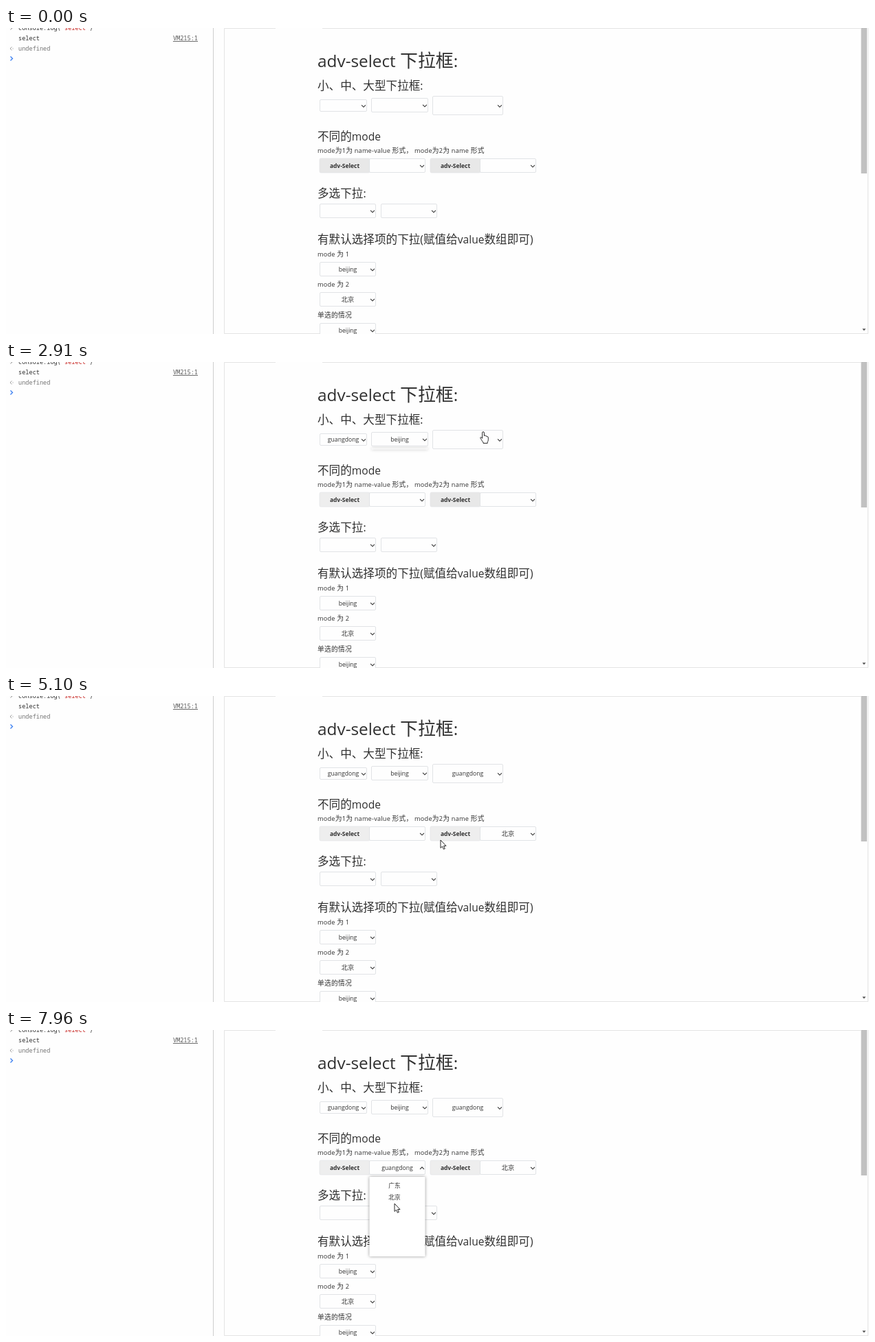
Write an HTML page that moves like this. It is 1255 by 446 pixels and loops after 8 s.

```html
<!DOCTYPE html>
<html lang="zh-CN">
<head>
<meta charset="utf-8">
<title>adv-select</title>
<style>
html, body { margin: 0; width: 100%; height: 100%; overflow: hidden; background: #fefefe; }
#stage { display: block; width: 1255px; height: 446px; }
text { font-family: "Open Sans", "Noto Sans CJK SC", "Noto Sans CJK JP", sans-serif; fill: #303030; white-space: pre; }
.mono { font-family: "Noto Sans Mono", "DejaVu Sans Mono", monospace; }
.note { letter-spacing: .22px; }
.box { fill: #fefefe; stroke: #e1e3e6; }
.chev { fill: none; stroke: #303030; stroke-width: 1.1; }
.panel { fill: #fff; filter: drop-shadow(0 .5px 2px rgba(0,0,0,.42)); }
.pointer { fill: #fff; stroke: #111; stroke-width: .9; stroke-linejoin: round; }
</style>
</head>
<body>
<svg id="stage" viewBox="0 0 1255 446"></svg>
<script>
const stage = document.getElementById('stage');
const LOOP = 8000, FULL = 116, SLIDE = 310, ROW = 17, LEFT = 453;

function set(n, attrs) {
  for (const k in attrs) n.setAttribute(k, attrs[k]);
}
function el(tag, attrs, parent = stage) {
  const n = document.createElementNS('http://www.w3.org/2000/svg', tag);
  set(n, attrs);
  return parent.appendChild(n);
}
const show = (n, on) => { n.style.display = on ? '' : 'none'; };
const line = (d, stroke) => el('path', { d, stroke, fill: 'none' });

// Latin runs are set slightly smaller than the Chinese ones
function write(node, str, size) {
  node.textContent = '';
  for (const run of str.match(/[\u3000-\uffff]+|[^\u3000-\uffff]+/g) || []) {
    const wide = run.charCodeAt(0) >= 0x3000;
    el('tspan', { 'font-size': wide ? size : size * .94 }, node).textContent = run;
  }
}
function label(x, y, str, size, attrs = {}, parent = stage) {
  const n = el('text', { x, y, ...attrs }, parent);
  write(n, str, size);
  return n;
}
const mid = { 'text-anchor': 'middle' };

// console
function mono(x, y, str, fill, more = {}) {
  const n = el('text', { x, y, class: 'mono', 'font-size': 8.6, style: 'fill:' + fill, ...more });
  n.textContent = str;
  return n;
}
const code = mono(18, 2.6, 'console.log(', '#303030');
el('tspan', { fill: '#c41a16' }, code).textContent = '"select"';
el('tspan', {}, code).textContent = ')';
mono(18, 18, 'select', '#303030');
mono(279, 18, 'VM215:1', '#545454', { 'text-anchor': 'end', 'text-decoration': 'underline' });
mono(18, 33, 'undefined', '#777');
line('M6.5 -3.5l3 3l-3 3', '#888');
line('M8.5 27.5L6 30l2.5 2.5M9.5 30h1.2', '#a0a0a0');
set(line('M6.5 41.5l3 3l-3 3', '#367cf1'), { 'stroke-width': 1.3 });

// page frame
line('M301.5 0V446', '#cfcfcf');
line('M392 .5H317.5V445.5H1253.5V0M460 .5H1243', '#e4e4e4');
el('rect', { x: 1243.5, y: 0, width: 8.5, height: 212, fill: '#c1c1c1' });
el('path', { d: 'M1245.3 438.3h5l-2.5 3z', fill: '#505050' });

// headings and notes
const heading = (y, s) => label(LEFT, y, s, 16.6);
const note = (y, s) => label(LEFT, y, s, 9.75, { class: 'note' });
label(LEFT, 57.3, 'adv-select 下拉框:', 25.9);
heading(89.8, '小、中、大型下拉框:');
heading(163.7, '不同的mode');
heading(247.3, '多选下拉:');
heading(314.3, '有默认选择项的下拉(赋值给value数组即可)');
note(182, 'mode为1为 name-value 形式， mode为2为 name 形式');
['mode 为 1', 'mode 为 2', '单选的情况'].forEach((s, i) => note(332.5 + 44.5 * i, s));

// select boxes
const UP = 'M-2.9 1.5L0 -1.4L2.9 1.5', DOWN = 'M-2.9 -1.4L0 1.5L2.9 -1.4';
function select(x, y, value = '', w = 82, h = 21) {
  el('rect', { x: x + .5, y: y + .5, width: w - 1, height: h - 1, rx: 1.5, class: 'box' });
  const cy = y + h / 2;
  const text = label(x + w / 2, cy + 3.4, value, 9.2, mid);
  const chev = el('path', { d: DOWN, class: 'chev', transform: `translate(${x + w - 5} ${cy + .8})` });
  return { x, y, w, h, cy, text, chev };
}
function tagged(x) {
  const tag = el('rect', { x, y: 190, width: 73, height: 21, rx: 2, stroke: '#dfe1e4', 'stroke-width': .6 });
  label(x + 36.5, 203.9, 'adv-Select', 9, { ...mid, 'font-weight': 700 });
  return { ...select(x + 72, 190), tag };
}
const small = select(456, 104, '', 69, 18);
const medium = select(531, 102, '', 83);
const large = select(620, 99, '', 103, 28);
const first = tagged(456), second = tagged(617);
const selects = [small, medium, large, first, second];
[456, 545].forEach(x => select(x, 256));
['beijing', '北京', 'beijing'].forEach((v, i) => select(456, Math.round(340.6 + 44.5 * i), v));

// drop-down panels
for (const s of selects) {
  s.top = s.y + s.h + 3;
  s.panel = el('g', {});
  s.back = el('rect', { x: s.x + .5, y: s.top, width: s.w - 1, rx: 1, class: 'panel' }, s.panel);
  s.clip = el('svg', { x: s.x, y: s.top, width: s.w, overflow: 'hidden' }, s.panel);
  s.rows = ['广东', '北京'].map((name, i) => ({
    bar: el('rect', { x: 4, y: 4 + ROW * i, width: s.w - 8, height: ROW, fill: '#5272da' }, s.clip),
    text: label(s.w / 2 - 4, 15.9 + ROW * i, name, 8.7, mid, s.clip)
  }));
}

// each visit: click the box, slide to a row, click that; aim is the place across the box
const visits = [
  { s: small, aim: .63, open: 700, pick: 1490, row: 0, value: 'guangdong' },
  { s: medium, aim: .53, open: 1840, pick: 2530, row: 1, value: 'beijing' },
  { s: large, aim: .72, open: 2990, pick: 3490, row: 0, value: 'guangdong' },
  { s: second, aim: .72, open: 4170, pick: 4640, row: 1, value: '北京' },
  { s: first, aim: .56, open: 5360, pick: 6090, row: 1, value: 'beijing' },
  { s: first, aim: .56, open: 6550, pick: 7010, row: 0, value: 'guangdong' },
  { s: first, aim: .5, open: 7540, pick: LOOP + 500, row: 1, value: '' }
];

// pointer stops: the visits plus a few detours
const stops = [
  [130, 730, 405], [1200, 499, 148], [2740, 642, 97], [2910, 694, 102], [5100, 632, 210], [7950, 565, 253]
];
for (const { s, aim, open, pick, row } of visits) {
  const x = s.x + aim * s.w, y = s.top + 4 + ROW * (row + .5);
  stops.push([open - 60, x, s.cy], [open + 90, x, s.cy], [open + 210, x, y], [pick + 20, x, y]);
}
stops.sort((a, b) => a[0] - b[0]);

const arrow = el('path', { class: 'pointer', d: 'M0 0V11.5L2.6 9.2L4.4 13.3L6.3 12.5L4.6 8.5H8Z' });
const hand = el('path', { class: 'pointer', d:
  'M-1.4 1Q-1.4 -.3 0 -.3Q1.4 -.3 1.4 1V5.6Q1.6 4.7 2.8 5Q3.8 5.2 3.9 6Q5.3 5.4 5.7 6.7' +
  'Q7.3 6.4 7.3 8.2V11.5Q7.2 13.3 6.2 14.5V16.3H0V15Q-1.5 13.5 -2.5 11.4Q-4 9.3 -4.2 8.4' +
  'Q-4 7.2 -2.7 7.8L-1.4 9.2Z' });

function ease(v) {
  v = Math.min(1, Math.max(0, v));
  return v * v * (3 - 2 * v);
}

function pointerAt(t) {
  const i = stops.findIndex(p => p[0] > t);
  if (i < 1) return null;
  const [t0, x0, y0] = stops[i - 1], [t1, x1, y1] = stops[i];
  const k = ease((t - t0) / (t1 - t0));
  return [x0 + (x1 - x0) * k, y0 + (y1 - y0) * k];
}

// returns whether the pointer is over something clickable
function drawSelect(s, t, p) {
  let value = '', open = false, visible = false, h = 0;
  for (const v of visits) {
    if (v.s !== s || t < v.open) continue;
    const from = v.open + 80;
    open = t < v.pick;
    if (!open) value = v.value;
    visible = t >= from && t < v.pick + SLIDE + 90;
    h = FULL * (open ? ease((t - from) / SLIDE) : 1 - ease((t - v.pick) / SLIDE));
  }
  if (s.value !== value) write(s.text, s.value = value, 9.2);
  s.chev.setAttribute('d', open ? UP : DOWN);
  show(s.panel, visible);
  s.back.setAttribute('height', Math.max(1.2, h));
  s.clip.setAttribute('height', h);

  const inX = p && p[0] > s.x && p[0] < s.x + s.w;
  let hot = inX && p[1] >= s.y && p[1] < s.y + s.h;
  s.rows.forEach((row, i) => {
    const dy = p ? p[1] - s.top - 4 - ROW * i : -1;
    const over = visible && inX && dy >= 0 && dy < ROW && p[1] < s.top + h;
    show(row.bar, over);
    row.text.style.fill = over ? '#fff' : '#303030';
    hot = hot || over;
  });
  return hot;
}

function draw(t) {
  const p = pointerAt(t);
  const hot = selects.map(s => drawSelect(s, t, p)).some(Boolean);
  first.tag.setAttribute('fill', small.value ? '#eee' : '#e8e8e8');
  second.tag.setAttribute('fill', large.value ? '#eee' : '#e8e8e8');
  show(hand, p && hot);
  show(arrow, p && !hot);
  if (p) set(hot ? hand : arrow, { transform: `translate(${p[0]} ${p[1]})` });
}

function tick() {
  draw(performance.now() % LOOP);
  requestAnimationFrame(tick);
}
tick();
</script>
</body>
</html>
```
